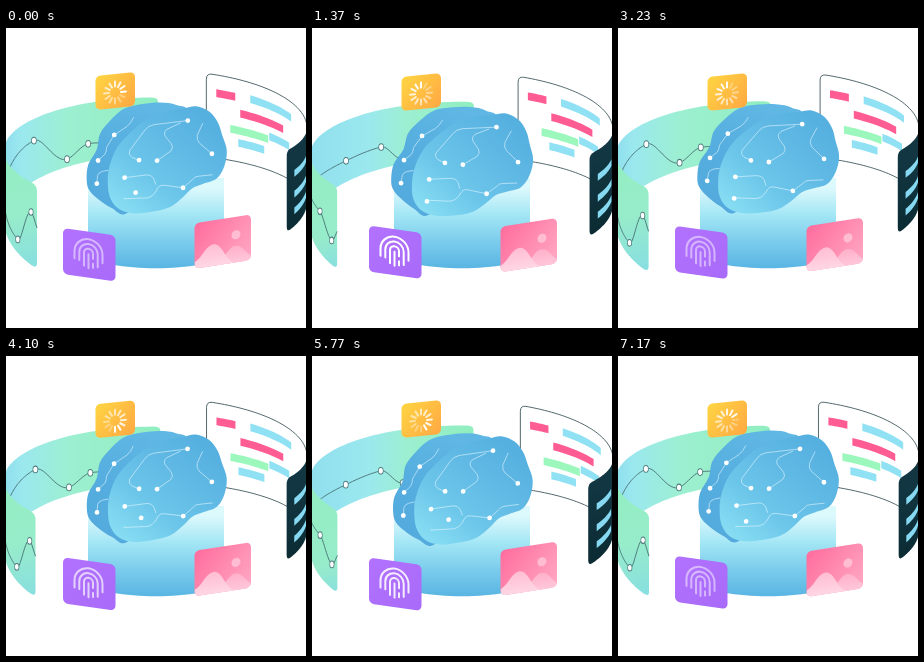
Animation, 300 px wide and 300 px high, one loop 7.21 s. Source, as an HTML page with a canvas:

```html
<!DOCTYPE html>
<html lang="en">
<head>
<meta charset="utf-8">
<title>Data brain</title>
<style>
html, body { margin: 0; width: 100%; height: 100%; overflow: hidden; background: #fff; }
canvas { display: block; width: 300px; height: 300px; }
</style>
</head>
<body>
<canvas id="stage"></canvas>
<script>
const canvas = document.getElementById('stage');
const ctx = canvas.getContext('2d');
const dpr = window.devicePixelRatio || 1;
canvas.width = canvas.height = 300 * dpr;

const SWING = 3605;
const TAU = Math.PI * 2;
const wave = (p, shift) => Math.cos(TAU * (p - shift));
const clamp = v => Math.max(0, Math.min(1, v));
const smooth = v => v * v * (3 - 2 * v);
const mix = (a, b, k) => a + (b - a) * k;

function gradient(x0, y0, x1, y1, ...colors) {
  const g = ctx.createLinearGradient(x0, y0, x1, y1);
  colors.forEach((c, i) => g.addColorStop(i / (colors.length - 1), c));
  return g;
}

// A curved wall: angle > 0 is the far side, angle < 0 the near side.
// top and bottom hold the centre height, far radius and near radius.
function wall(dir, rx, top, bottom, dy) {
  return (a, v) => {
    const s = Math.sin(a), k = s > 0 ? 1 : 2;
    const y = mix(top[0] - top[k] * s, bottom[0] - bottom[k] * s, v);
    return [150 + dir * rx * Math.cos(a), y + dy];
  };
}

// Traces the wall from its fold to angle b; round softens the free end.
function tracePanel(pt, b, round) {
  const n = 40, inner = b - Math.sign(b) * round;
  ctx.beginPath();
  for (let i = 0; i <= n; i++) ctx.lineTo(...pt(inner * i / n, 0));
  ctx.quadraticCurveTo(...pt(b, 0), ...pt(b, 0.07));
  ctx.lineTo(...pt(b, 0.93));
  ctx.quadraticCurveTo(...pt(b, 1), ...pt(inner, 1));
  for (let i = n; i >= 0; i--) ctx.lineTo(...pt(inner * i / n, 1));
  ctx.closePath();
}

function node(x, y, r, edge) {
  ctx.beginPath();
  ctx.arc(x, y, r, 0, TAU);
  ctx.fillStyle = '#fff';
  ctx.fill();
  if (edge) {
    ctx.strokeStyle = edge;
    ctx.lineWidth = 0.9;
    ctx.stroke();
  }
}

// Chart points: angle, resting height, swapped height
const chart = [
  [-0.70, 0.55, 0.5], [-0.606, 0.36, 0.70], [-0.43, 0.83, 0.47],
  [0.638, 0.35, 0.655], [0.945, 0.87, 0.63], [1.108, 0.7, 0.92], [1.4, 0.8, 0.6]
];

function drawChart(pt, rot, flip, near) {
  const pts = chart.map(([a, v, w]) => [a + rot, mix(v, w, flip)]);
  const from = near ? -0.672 + rot : 0, to = near ? 0 : 1.35;
  ctx.beginPath();
  for (let i = 0; i <= 90; i++) {
    const a = mix(from, to, i / 90);
    let j = 0;
    while (j < pts.length - 2 && a > pts[j + 1][0]) j++;
    const [p, q] = [pts[j], pts[j + 1]];
    const k = smooth(clamp((a - p[0]) / (q[0] - p[0])));
    ctx.lineTo(...pt(a, mix(p[1], q[1], k)));
  }
  ctx.strokeStyle = '#476f73';
  ctx.lineWidth = 0.9;
  ctx.stroke();
  for (const [a, v] of pts.slice(1, 6)) {
    if ((a < 0) !== near) continue;
    const [x, y] = pt(a, v);
    ctx.save();
    ctx.translate(x, y);
    ctx.scale(near ? 0.75 : 0.85, 1.15);
    node(0, 0, 2.9, '#4e7a7d');
    ctx.restore();
  }
}

function drawLeft(pt, rot, flip, near) {
  if (near) {
    tracePanel(pt, -0.672 + rot, 0.06);
    const g = ctx.createLinearGradient(0, 135, 28, 238);
    g.addColorStop(0, '#93eec2');
    g.addColorStop(0.5 + 0.2 * flip, '#97ecca');
    g.addColorStop(1, '#88dfdf');
    ctx.fillStyle = g;
  } else {
    tracePanel(pt, 1.584 + rot, 0.05);
    const g = ctx.createLinearGradient(0, 0, 160, 0);
    g.addColorStop(0, '#90dfee');
    g.addColorStop(0.1 + 0.25 * flip, '#9be8ee');
    g.addColorStop(0.4 + 0.2 * flip, '#9cefd0');
    g.addColorStop(1, '#90eebe');
    ctx.fillStyle = g;
  }
  ctx.fill();
  drawChart(pt, rot, flip, near);
}

function bar(pt, a, b, v, color, half) {
  ctx.beginPath();
  for (let i = 0; i <= 10; i++) ctx.lineTo(...pt(mix(a, b, i / 10), v - half));
  for (let i = 10; i >= 0; i--) ctx.lineTo(...pt(mix(a, b, i / 10), v + half));
  ctx.closePath();
  ctx.fillStyle = color;
  ctx.fill();
}

// Bars: left x, right x, height on the panel, colour
const bars = [
  [210, 229, 0.22, '#ff5c93'], [244, 285, 0.2, '#8fe1f3'],
  [234, 277, 0.41, '#ff5c93'], [224, 262, 0.62, '#9cf7bd'],
  [263, 283, 0.58, '#8fe1f3'], [232, 258, 0.77, '#8fe1f3']
];

function drawRight(pt, rot, near) {
  if (near) {
    tracePanel(pt, -0.522 - rot, 0.05);
    ctx.fillStyle = gradient(276, 130, 300, 200, '#123743', '#0c2b33');
    ctx.fill();
    for (const v of [0.34, 0.6, 0.81])
      bar(pt, -0.41 - rot, -0.1 - rot, v, '#86d9f0', 0.042);
    return;
  }
  tracePanel(pt, 1.233 - rot, 0.04);
  ctx.fillStyle = '#fff';
  ctx.fill();
  ctx.strokeStyle = '#29434b';
  ctx.lineWidth = 0.8;
  ctx.stroke();
  const angle = x => Math.acos((x - 150) / 151) - rot;
  for (const [x0, x1, v, color] of bars) bar(pt, angle(x0), angle(x1), v, color, 0.047);
}

function drawCylinder() {
  ctx.beginPath();
  ctx.moveTo(82, 150);
  ctx.lineTo(82, 226);
  ctx.bezierCurveTo(94, 245, 206, 245, 218, 226);
  ctx.lineTo(218, 150);
  ctx.closePath();
  ctx.fillStyle = gradient(0, 160, 0, 241, '#dcf9fc', '#a3e6f5', '#7accec', '#58b4e2');
  ctx.fill();
}

// Smooth closed curve through all points
function traceLoop(p) {
  const n = p.length, at = i => p[(i + n) % n];
  ctx.beginPath();
  ctx.moveTo(...p[0]);
  for (let i = 0; i < n; i++) {
    const [a, b, c, d] = [at(i - 1), at(i), at(i + 1), at(i + 2)];
    ctx.bezierCurveTo(b[0] + (c[0] - a[0]) / 6, b[1] + (c[1] - a[1]) / 6,
      c[0] - (d[0] - b[0]) / 6, c[1] - (d[1] - b[1]) / 6, c[0], c[1]);
  }
  ctx.closePath();
}

const backLobe = [[80, 153], [82, 138], [91, 123], [95, 107], [106, 94], [120, 83],
  [138, 79], [156, 78], [172, 81], [182, 92], [150, 150], [120, 187], [104, 182],
  [90, 172], [82, 163]];
const frontLobe = [[101, 158], [103, 141], [112, 121], [129, 104], [145, 93], [163, 87],
  [178, 85], [192, 83], [205, 89], [213, 100], [217, 113], [221, 128], [218, 144],
  [210, 156], [196, 161], [185, 165], [175, 174], [162, 183], [144, 187], [125, 188],
  [111, 183], [103, 172]];

const traces = [
  'M183 97L149 100Q143 101 140 105L124 125Q122 129 126 132L133 135',
  'M151 136L165 127Q168 124 166 120L160 112Q158 108 162 105L176 99',
  'M206 131L194 120Q191 117 192 112L198 100',
  'M176 164L186 156Q188 153 192 153L206 152',
  'M118 152L140 150Q145 150 147 154L149 160',
  'M116 173L140 173Q145 172 148 168L151 163Q153 160 158 161L176 164',
  'M90 157L91 149Q92 146 96 145L102 144',
  'M92 134L99 128Q101 125 101 121L109 109L122 101Q126 98 129 92'
].map(d => new Path2D(d));
const nodes = [[183, 97], [206, 131], [176, 164], [151, 136], [133, 135],
  [118, 152], [90, 157], [92, 134], [109, 109]];

function drawBrain(p, q) {
  ctx.save();
  ctx.translate(135, 133 - 1.2 - 1.7 * wave(p, 0));
  ctx.rotate(-3.2 * wave(q, 0.15) * Math.PI / 180);
  ctx.translate(-135, -133);
  traceLoop(backLobe);
  ctx.fillStyle = gradient(140, 80, 90, 180, '#60b7e4', '#55aedf', '#54aadd');
  ctx.fill();
  traceLoop(frontLobe);
  ctx.fillStyle = gradient(200, 88, 118, 186, '#55afdf', '#60b9e4', '#6cc6ea', '#86dcf2');
  ctx.fill();
  ctx.strokeStyle = 'rgba(225,246,255,.75)';
  ctx.lineWidth = 0.8;
  ctx.lineJoin = 'round';
  for (const path of traces) ctx.stroke(path);
  for (const [x, y] of nodes) node(x, y, 2.4);
  const slide = wave(q, 0.2);
  node(125.5 + 9.5 * slide, 169 - 5.5 * slide, 2.4);
  ctx.restore();
}

function card(x, y, w, h, skew, c0, c1, paint) {
  ctx.save();
  ctx.transform(1, skew, 0, 1, x, y);
  ctx.beginPath();
  ctx.roundRect(0, 0, w, h, 5);
  ctx.fillStyle = gradient(0, 0, w, h, c0, c1);
  ctx.fill();
  ctx.clip();
  paint();
  ctx.restore();
}

function drawSpinner(p) {
  ctx.translate(19.5, 18.5);
  ctx.lineWidth = 2;
  ctx.lineCap = 'round';
  const turn = p * 24;
  for (let i = 0; i < 12; i++) {
    const a = i / 12 * TAU;
    const fade = (((i - turn) % 12) + 12) % 12 / 12;
    ctx.strokeStyle = `rgba(255,255,255,${0.25 + 0.75 * fade})`;
    ctx.beginPath();
    ctx.moveTo(6 * Math.cos(a), 6 * Math.sin(a));
    ctx.lineTo(11 * Math.cos(a), 11 * Math.sin(a));
    ctx.stroke();
  }
}

function drawPrint(p) {
  ctx.translate(25.5, 21.5);
  ctx.globalAlpha = 0.75 - 0.27 * wave(p, -0.07);
  ctx.strokeStyle = '#fff';
  ctx.lineWidth = 2;
  ctx.lineCap = 'round';
  // Arches: radius, left leg, right leg
  [[4.5, 13, 5], [9.2, 8, 13], [14, 7, 8]].forEach(([r, left, right]) => {
    ctx.beginPath();
    ctx.moveTo(-r, left);
    ctx.lineTo(-r, 0);
    ctx.arc(0, 0, r, Math.PI, TAU);
    ctx.lineTo(r, right);
    ctx.stroke();
  });
  ctx.beginPath();
  ctx.moveTo(0, 1);
  ctx.lineTo(0, 15);
  ctx.moveTo(4.5, 10);
  ctx.lineTo(4.5, 14);
  ctx.stroke();
}

function drawPicture() {
  ctx.fillStyle = gradient(0, 29, 0, 45, '#ffb0ca', '#ffc6d9');
  ctx.beginPath();
  ctx.moveTo(20, 46);
  ctx.bezierCurveTo(30, 40, 34, 29, 41, 29);
  ctx.bezierCurveTo(48, 29, 51, 38, 58, 42);
  ctx.lineTo(58, 46);
  ctx.fill();
  ctx.fillStyle = gradient(0, 24, 0, 45, '#ffbdd3', '#ffd6e3');
  ctx.beginPath();
  ctx.moveTo(0, 39);
  ctx.bezierCurveTo(8, 36, 11, 24, 19, 24);
  ctx.bezierCurveTo(28, 24, 30, 41, 40, 46);
  ctx.lineTo(0, 46);
  ctx.fill();
  ctx.beginPath();
  ctx.arc(41.5, 18, 4.5, 0, TAU);
  ctx.fill();
}

function draw(t) {
  const p = (t % SWING) / SWING, q = (p * 2) % 1;
  const swingLeft = 0.036 - 0.036 * wave(p, -0.02);
  const swingRight = 0.03 - 0.03 * wave(p, 0.06);
  const flip = smooth(clamp(0.5 - 0.75 * wave(p, -0.02)));
  const left = wall(-1, 152, [122, 53, 56], [192, 66, 78], 3 - 3.2 * wave(q, 0.1));
  const right = wall(1, 151, [100, 58, 45], [174, 48, 60], 1.5 - 1.5 * wave(p, 0.05));

  ctx.setTransform(dpr, 0, 0, dpr, 0, 0);
  ctx.fillStyle = '#fff';
  ctx.fillRect(0, 0, 300, 300);

  drawLeft(left, swingLeft, flip, false);
  drawRight(right, swingRight, false);
  drawCylinder();
  drawBrain(p, q);
  drawLeft(left, swingLeft, flip, true);
  drawRight(right, swingRight, true);

  card(89.5, 48.6 - 0.8 * wave(q, 0.1), 39.5, 34, -0.1, '#ffd542', '#ffa843', () => drawSpinner(p));
  card(57, 199.5 + 2 * wave(q, 0.2), 52.5, 46, 0.14, '#b272ff', '#a86af8', () => drawPrint(p));
  card(188.5, 196.7 - 2.6 * wave(q, 0.15), 56.5, 45.5, -0.155, '#ff6c9d', '#ffa9c4', drawPicture);
}

const start = performance.now();
function tick() {
  draw(performance.now() - start);
  requestAnimationFrame(tick);
}
tick();
</script>
</body>
</html>
```
